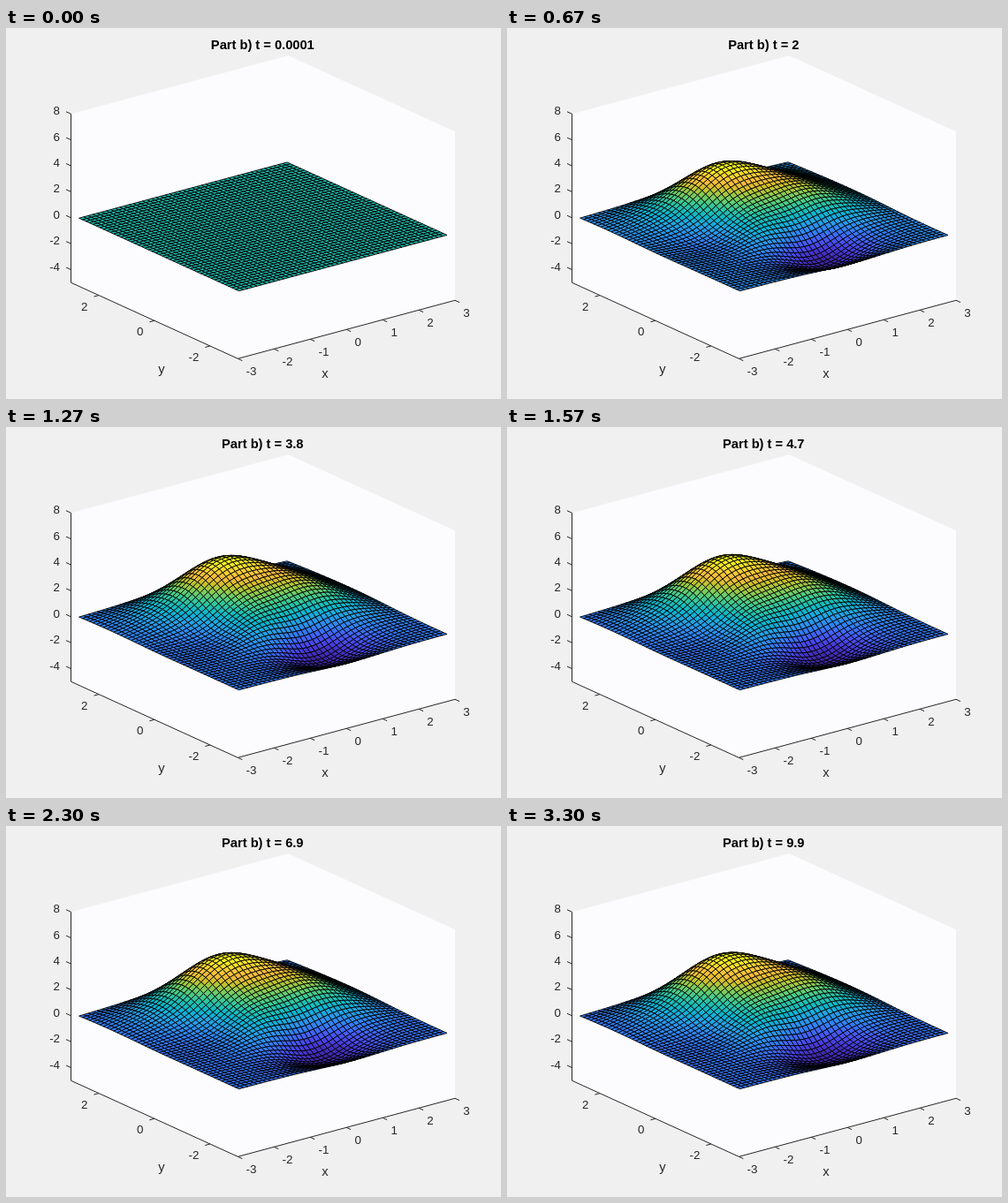
Recreate the animation shown at these times as an HTML page with a canvas. Size 560 by 420 pixels, loop 3330 ms.

```html
<!DOCTYPE html>
<html lang="en">
<head>
<meta charset="utf-8">
<style>
html, body { margin: 0; width: 100%; height: 100%; overflow: hidden; background: #f0f0f0; }
canvas { display: block; }
</style>
</head>
<body>
<canvas id="plot" width="560" height="420"></canvas>
<script>
const ctx = document.getElementById('plot').getContext('2d');
const LOOP = 3330, FRAME = 100 / 3;
const N = 47, MODES = 26, H = 6 / (N + 1), INK = '#262626';
const FONT = '"Liberation Sans", Arial, sans-serif';
const axis = Array.from({ length: N }, (_, i) => -3 + (i + 1) * H);

const project = (x, y, z) => [
  262.3 + 40.95 * (x + 3) - 31.46 * (y + 3),
  374.3 - 11 * (x + 3) - 14.34 * (y + 3) - 14.69 * (z + 5)
];

// Colour map stops, evenly spaced from low to high
const stops = ('3e26a8 4533cb 4747eb 4361fd 327cfc 2b91ef 20a5e3 08b5d0 19bfb6 ' +
  '37c897 64cd6f 9dc943 d1bf27 f8ba3d fccf30 f5e924 f9fb15').split(' ')
  .map(hex => [0, 2, 4].map(k => parseInt(hex.slice(k, k + 2), 16)));
const palette = Array.from({ length: 64 }, (_, i) => {
  const p = i / 63 * (stops.length - 1), k = Math.min(Math.floor(p), stops.length - 2);
  return `rgb(${stops[k].map((c, j) => Math.round(c + (stops[k + 1][j] - c) * (p - k)))})`;
});

// Heat equation u_t = u_xx + u_yy + peaks(x, y), zero at the border, solved in sine modes
const peaks = (x, y) =>
  3 * (1 - x) ** 2 * Math.exp(-x * x - (y + 1) ** 2)
  - 10 * (x / 5 - x ** 3 - y ** 5) * Math.exp(-x * x - y * y)
  - Math.exp(-((x + 1) ** 2) - y * y) / 3;
const multiply = (a, b) => a.map(row => b[0].map((_, j) =>
  row.reduce((sum, v, k) => sum + v * b[k][j], 0)));
const transpose = a => a[0].map((_, j) => a.map(row => row[j]));
const sines = axis.map((_, i) => Array.from({ length: MODES }, (_, m) =>
  Math.sin(Math.PI * (i + 1) * (m + 1) / (N + 1))));
const sinesT = transpose(sines);
const source = axis.map(x => axis.map(y => peaks(x, y)));
const modes = multiply(multiply(sinesT, source), sines)
  .map(row => row.map(v => v * 4 / (N + 1) ** 2));

function solve(t) {
  const grown = modes.map((row, m) => row.map((v, n) => {
    const rate = (Math.PI / 6) ** 2 * ((m + 1) ** 2 + (n + 1) ** 2);
    return v * (1 - Math.exp(-rate * t)) / rate;
  }));
  return multiply(multiply(sines, grown), sinesT);
}

function trace(points) {
  ctx.beginPath();
  points.forEach(p => ctx.lineTo(...p));
}

function label(text, x, y, align, size = 13.33, weight = '', color = INK) {
  ctx.font = `${weight} ${size}px ${FONT}`;
  ctx.textAlign = align;
  ctx.fillStyle = color;
  ctx.fillText(text, x, y);
}

function tick([x, y], dx, dy) {
  trace([[x, y], [x + dx, y + dy]]);
  ctx.stroke();
}

function drawAxes() {
  ctx.fillStyle = '#f0f0f0';
  ctx.fillRect(0, 0, 560, 420);
  trace([[-3, 3, 8], [3, 3, 8], [3, -3, 8], [3, -3, -5], [-3, -3, -5], [-3, 3, -5]]
    .map(p => project(...p)));
  ctx.fillStyle = '#fcfcfe';
  ctx.fill();
  ctx.strokeStyle = INK;
  ctx.lineWidth = 1;
  trace([[-3, 3, 8], [-3, 3, -5], [-3, -3, -5], [3, -3, -5]].map(p => project(...p)));
  ctx.stroke();
  for (let x = -3; x <= 3; x++) {
    const p = project(x, -3, -5);
    tick(p, 5, 2.3);
    label(x, p[0] + 9.3, p[1] + 18.2, 'left');
  }
  for (let y = -2; y <= 2; y += 2) {
    const p = project(-3, y, -5);
    tick(p, -5.5, 1.5);
    label(y, p[0] - 12.5, p[1] + 17, 'right');
  }
  for (let z = -4; z <= 8; z += 2) {
    const p = project(-3, 3, z);
    tick(p, -5.5, -2.5);
    label(z, 61, p[1] + 1, 'right');
  }
  label('x', 361, 396, 'center', 14.67);
  label('y', 176, 391, 'center', 14.67);
}

function drawSurface(u) {
  const values = u.flat(), low = Math.min(...values), span = Math.max(...values) - low;
  const points = u.map((row, i) => row.map((z, j) => project(axis[i], axis[j], z)));
  ctx.strokeStyle = '#000';
  ctx.lineWidth = 0.9;
  ctx.lineJoin = 'round';
  for (let j = N - 2; j >= 0; j--) {
    for (let i = N - 2; i >= 0; i--) {
      const level = span ? (u[i][j] - low) / span : 0.5;
      ctx.fillStyle = palette[Math.min(63, Math.floor(level * 64))];
      trace([points[i][j], points[i + 1][j], points[i + 1][j + 1], points[i][j + 1]]);
      ctx.closePath();
      ctx.fill();
      ctx.stroke();
    }
  }
}

let shown = -1;
function render(now) {
  const time = Math.floor(now % LOOP / 10) * 10;
  const step = Math.floor((time + 5) / FRAME);
  if (step !== shown) {
    shown = step;
    drawAxes();
    drawSurface(solve(step / 10));
    label(`Part b) t = ${step ? step / 10 : 0.0001}`, 290.3, 24, 'center', 14.67, 'bold', '#000');
  }
  requestAnimationFrame(render);
}
render(performance.now());
</script>
</body>
</html>
```
